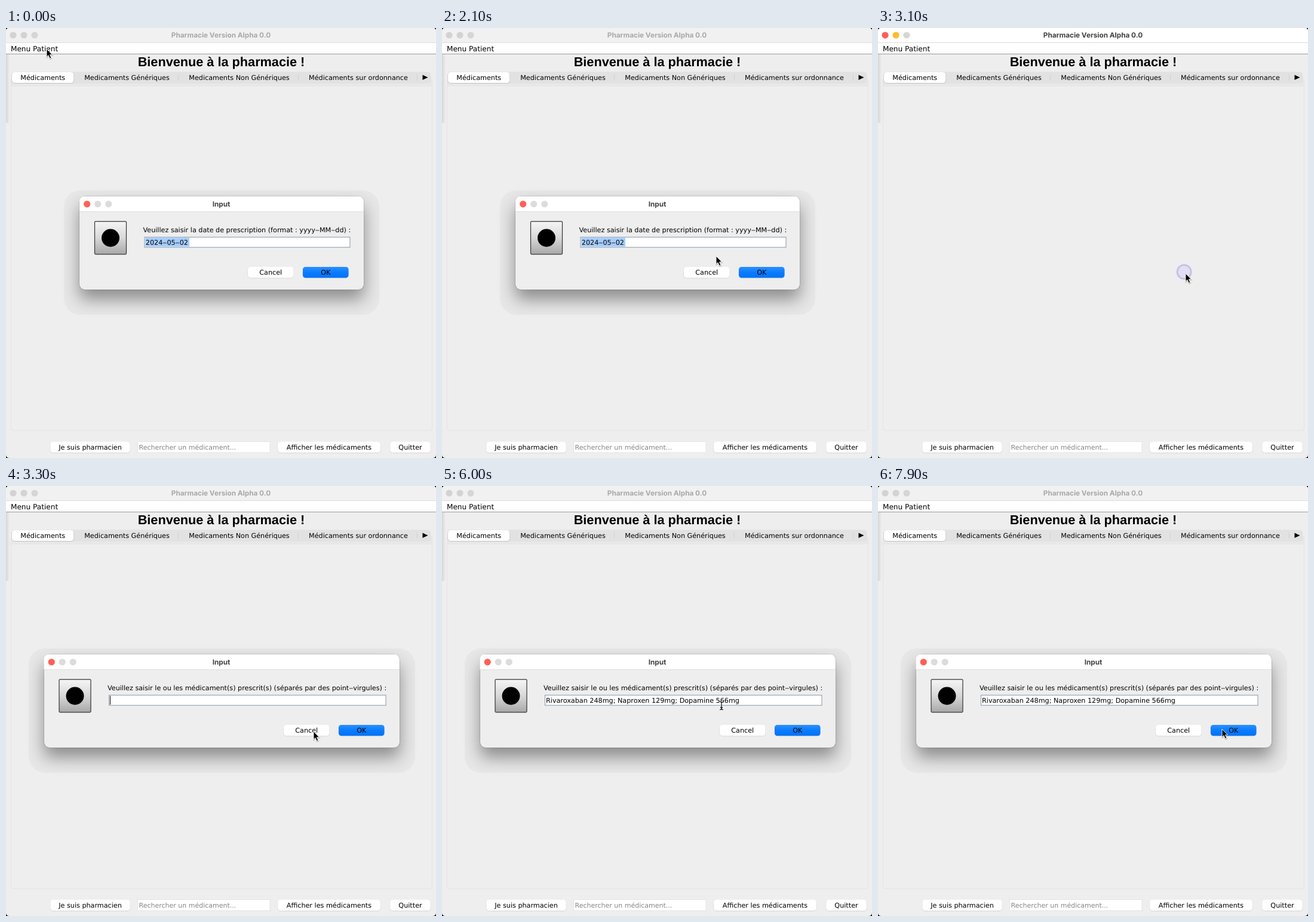
Animation of 720x720 px, one loop 8000 ms. Source, as an HTML page:

```html
<!DOCTYPE html>
<html lang="fr">
<head>
<meta charset="utf-8">
<title>Pharmacie</title>
<style>
html, body { margin: 0; width: 100%; height: 100%; overflow: hidden; background: #101010; }
#stage { position: absolute; left: 0; top: 0; width: 720px; height: 720px; overflow: hidden; }
svg { position: absolute; left: 0; top: 0; width: 720px; height: 720px; }
text { font: 11.2px 'DejaVu Sans', sans-serif; text-rendering: geometricPrecision; fill: #000; white-space: pre; }
text.menu { font-size: 12.1px; }
text.hint { font-size: 11px; fill: #858585; }
text.title { font: 700 11.75px Inter, sans-serif; fill: #404040; }
text.head { font: 700 21.7px 'Liberation Sans', Arial, sans-serif; }
.mid { text-anchor: middle; }
.box {
  position: absolute; top: 282px; height: 156px; border-radius: 9px; background: #eee;
  box-shadow: 0 0 0 .6px rgba(0,0,0,.2), 0 16px 28px rgba(0,0,0,.4), 0 16px 0 26px rgba(0,0,0,.03);
}
</style>
</head>
<body>
<div id="stage"></div>
<script>
const stage = document.getElementById('stage');
const NS = 'http://www.w3.org/2000/svg';

function el(parent, tag, attrs, content) {
  const n = document.createElementNS(NS, tag);
  for (const k in attrs) n.setAttribute(k, attrs[k]);
  if (content) n.textContent = content;
  parent.appendChild(n);
  return n;
}
const rect = (p, x, y, width, height, fill, more) => el(p, 'rect', { x, y, width, height, fill, ...more });
const text = (p, x, y, s, cls = '') => el(p, 'text', { x, y, class: cls }, s);
const layer = parent => el(parent, 'svg', { viewBox: '0 0 720 720' });

function gradient(svg, id, stops) {
  const g = el(svg, 'linearGradient', { id, x1: 0, y1: 0, x2: 0, y2: 1 });
  stops.forEach((c, i) => el(g, 'stop', { offset: i / (stops.length - 1), 'stop-color': c }));
}

function button(p, x, y, w, label, fill = '#fff') {
  rect(p, x - .5, y + .3, w + 1, 19, '#000', { rx: 5, opacity: .1 });
  rect(p, x, y, w, 18.3, fill, { rx: 4.5 });
  text(p, x + w / 2, y + 13, label, 'mid');
}

function lights(p, x, y, colors) {
  return colors.map((fill, i) => el(p, 'circle', { cx: x + 18 * i, cy: y, r: 5.6, fill }));
}

// main window
const main = layer(stage);
gradient(main, 'blue', ['#2b90ff', '#0a7cff', '#0071f6']);
gradient(main, 'steel', ['#f6f6f6', '#d8d8d8', '#a8a8a8']);
const fade = el(main, 'linearGradient', { id: 'side' });
el(fade, 'stop', { offset: 0, 'stop-color': '#000', 'stop-opacity': .1 });
el(fade, 'stop', { offset: 1, 'stop-color': '#000', 'stop-opacity': 0 });

rect(main, 0, 0, 720, 720, '#eee', { rx: 5 });
const bar = el(main, 'path', { d: 'M0 25V5Q0 0 5 0H715Q720 0 720 5V25Z' });
const barLights = lights(main, 12, 12, ['#d3d3d3', '#d3d3d3', '#d6d6d6']);
const barTitle = text(main, 360, 16, 'Pharmacie Version Alpha 0.0', 'title mid');
rect(main, 0, 24, 720, 1, '#dcdcdc');
rect(main, 0, 25, 720, 18, '#fff');
rect(main, 0, 43, 720, 1, '#9c9c9c');
text(main, 8, 38.8, 'Menu Patient', 'menu');
text(main, 360.5, 64, 'Bienvenue à la pharmacie !', 'head mid');

rect(main, 8.5, 83.5, 705, 590.5, '#eee', { rx: 4, stroke: '#e4e4e4' });
rect(main, 9, 84, 704, 14, '#e8e8e8');
rect(main, 9, 73.5, 702.5, 19.5, '#e2e2e2', { rx: 5 });
rect(main, 9.5, 74, 104.5, 19, '#000', { rx: 5, opacity: .14 });
rect(main, 10, 74, 103.3, 18, '#fff', { rx: 4.5 });
text(main, 61.7, 87, 'Médicaments', 'mid');
text(main, 202.5, 87, 'Medicaments Génériques', 'mid');
text(main, 390.5, 87, 'Medicaments Non Génériques', 'mid');
text(main, 590, 87, 'Médicaments sur ordonnance', 'mid');
for (const x of [288, 489, 688]) rect(main, x, 78, 1, 10, '#d0d0d0');
el(main, 'path', { d: 'M697.5 78.5L706.5 82.8L697.5 87Z' });
rect(main, 0, 44, 6, 115, 'url(#side)');

button(main, 74.3, 692.7, 133.5, 'Je suis pharmacien');
button(main, 455, 692.7, 171.8, 'Afficher les médicaments');
button(main, 643.3, 692.7, 67.4, 'Quitter');
rect(main, 220.5, 692.5, 221.5, 18.5, '#fff', { stroke: '#e4e4e4' });
text(main, 222.5, 706, 'Rechercher un médicament...', 'hint');

// modal dialog, from its left edge and width
function dialog(left, width, message) {
  const root = document.createElement('div');
  stage.appendChild(root);
  const box = document.createElement('div');
  box.className = 'box';
  box.style.left = left + 'px';
  box.style.width = width + 'px';
  root.appendChild(box);
  const g = layer(root), right = left + width;
  el(g, 'path', { d: `M${left} 307V291q0-9 9-9H${right - 9}q9 0 9 9V307Z`, fill: '#fff' });
  rect(g, left, 307, width, 1, '#dedede');
  lights(g, left + 12.7, 294.8, ['#ff5f57', '#dcdcdc', '#dcdcdc']);
  text(g, 360.5, 298.6, 'Input', 'title mid');
  rect(g, left + 25.5, 323.8, 53, 55, 'url(#steel)', { rx: 1.5, stroke: '#333', 'stroke-width': 1.2 });
  el(g, 'circle', { cx: left + 52, cy: 351.5, r: 15, fill: '#000' });
  text(g, left + 106.5, 341.7, message);
  rect(g, left + 109, 350.2, width - 131.5, 17, '#fff', { stroke: '#8797a8' });
  button(g, right - 193.5, 400, 76.5, 'Cancel');
  button(g, right - 101.5, 400, 76.5, 'OK', 'url(#blue)');
  return { root, g };
}

const dateBox = dialog(123, 475.5, 'Veuillez saisir la date de prescription (format : yyyy‒MM‒dd) :');
rect(dateBox.g, 233.3, 351.2, 73.7, 15, '#a5cdff');
text(dateBox.g, 233.8, 363, '2024‒05‒02');

const drugBox = dialog(63.5, 595, 'Veuillez saisir le ou les médicament(s) prescrit(s) (séparés par des point‒virgules) :');
const drugs = text(drugBox.g, 174, 363, 'Rivaroxaban 248mg; Naproxen 129mg; Dopamine 566mg');
const caret = rect(drugBox.g, 174, 351.5, 1, 14.5, '#000');

// pointer
const overlay = layer(stage);
const ring = el(overlay, 'circle', {
  cx: 512.6, cy: 408.4, r: 11.6, fill: '#dcd8f2', 'fill-opacity': .7, stroke: '#c3bde9', 'stroke-width': 2.6
});
const arrow = el(overlay, 'g', {});
const arrowShape = 'M0 0V13.4L3 10.7L5.3 16L7.8 15L5.5 9.8H9.6Z';
el(arrow, 'path', { d: arrowShape, opacity: .18, transform: 'translate(.5 1.2)', stroke: '#000', 'stroke-width': 1.6 });
el(arrow, 'path', { d: arrowShape, stroke: '#fff', 'stroke-width': .9, 'stroke-linejoin': 'round' });
const beam = el(overlay, 'g', {});
const beamShape = 'M-3 -6.6Q0 -6.6 0 -5V5Q0 6.6 -3 6.6M3 -6.6Q0 -6.6 0 -5M0 5Q0 6.6 3 6.6M-2 3H2';
el(beam, 'path', { d: beamShape, fill: 'none', stroke: '#fff', 'stroke-width': 2.6, opacity: .7 });
el(beam, 'path', { d: beamShape, fill: 'none', stroke: '#111', 'stroke-width': 1.3 });

// pointer stops: time, x, y
const stops = [
  [0, 68, 35], [400, 68, 35], [600, 50, 16], [1100, 249, 223], [1200, 249, 223],
  [1500, 444, 404], [1600, 444, 404], [2100, 459, 382], [2400, 488, 418], [2500, 498, 411],
  [2600, 515, 411], [3300, 515, 411], [3800, 389, 358], [4500, 374.4, 357.3],
  [5400, 374.4, 357.3], [6000, 468, 368], [6400, 471, 376], [7100, 472.5, 379],
  [7400, 472.5, 379], [7700, 570, 406], [7800, 570, 406], [7900, 576, 407], [8000, 576, 407]
];

function pointerAt(t) {
  const i = stops.findIndex((p, n) => n && t <= p[0]);
  const [t0, x0, y0] = stops[i - 1], [t1, x1, y1] = stops[i];
  const u = (t - t0) / (t1 - t0), e = u * u * (3 - 2 * u);
  return [x0 + (x1 - x0) * e, y0 + (y1 - y0) * e];
}

const show = (n, on) => { n.style.display = on ? '' : 'none'; };

function render(t) {
  const first = t < 3100, second = t >= 3200, active = !first && !second;
  show(dateBox.root, first);
  show(drugBox.root, second);
  bar.setAttribute('fill', active ? '#fff' : '#f1f1f1');
  barTitle.style.fill = active ? '#404040' : '#a8a8a8';
  barLights[0].setAttribute('fill', active ? '#ff5f57' : '#d3d3d3');
  barLights[1].setAttribute('fill', active ? '#febc2e' : '#d3d3d3');
  show(ring, t >= 3000 && t < 3200);

  const pasted = t >= 5000, since = t - (pasted ? 5100 : 3300);
  show(drugs, pasted);
  show(caret, Math.floor(since / 500) % 2 === 0);
  caret.setAttribute('x', pasted ? 501 : 174);

  const [x, y] = pointerAt(t);
  const inField = second && y > 350 && y < 369 && x > 173 && x < 636;
  show(beam, inField);
  show(arrow, !inField);
  (inField ? beam : arrow).setAttribute('transform', `translate(${x} ${y})`);
}

const start = performance.now();
function tick() {
  const t = (performance.now() - start) % 8000;
  render(Math.floor(t / 100) * 100);
  requestAnimationFrame(tick);
}
tick();
</script>
</body>
</html>
```
